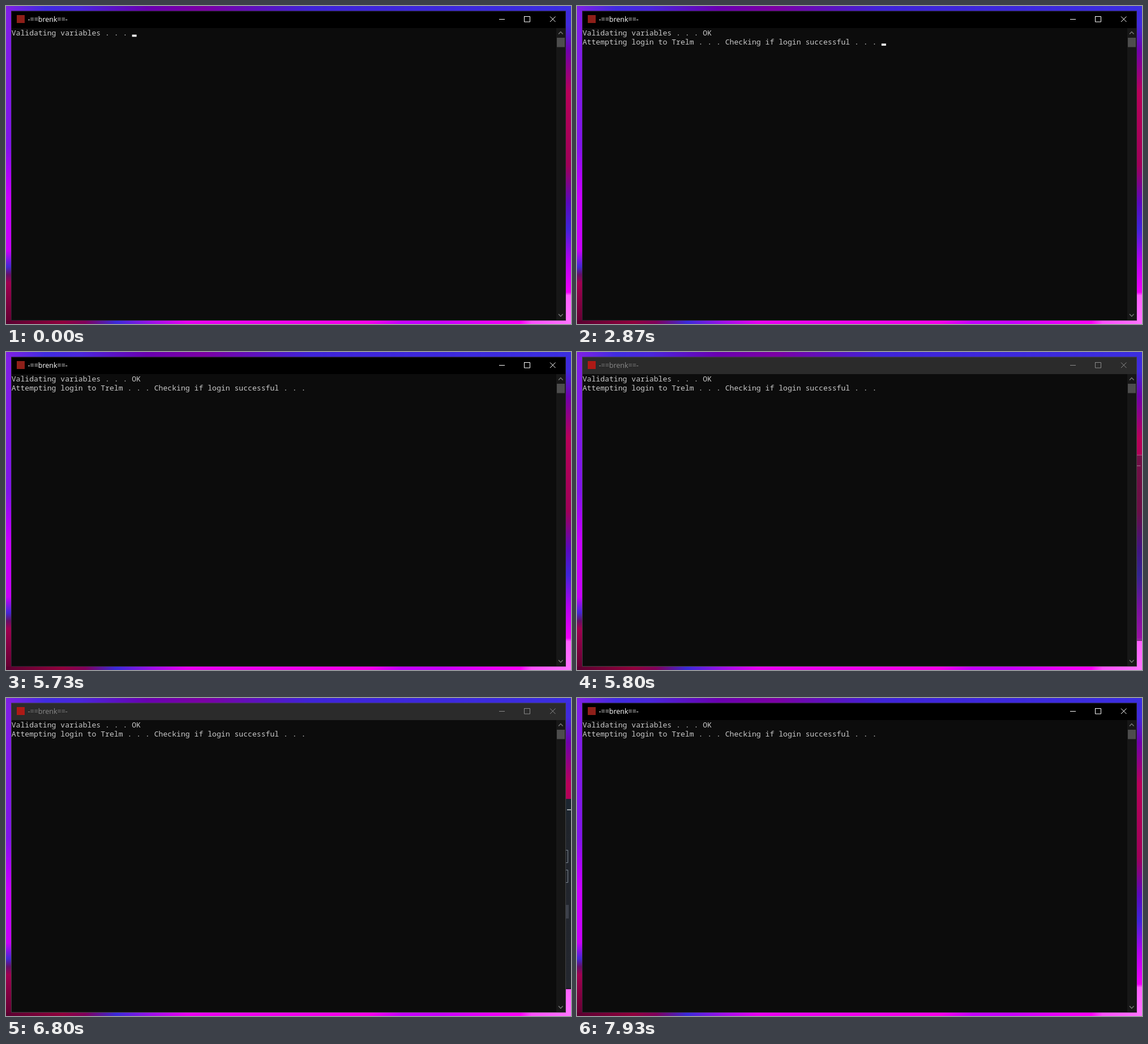
An HTML page with a canvas that plays this animation: 998 by 561 pixels, repeating every 8 s.

```html
<!DOCTYPE html>
<html lang="en">
<head>
<meta charset="utf-8">
<title>Console login</title>
<style>
  html, body { margin: 0; width: 100%; height: 100%; overflow: hidden; background: #000; }
  canvas { display: block; }
</style>
</head>
<body>
<canvas id="stage" width="998" height="561"></canvas>
<script>
const ctx = document.getElementById('stage').getContext('2d');
const W = 998, H = 561;
const LOOP = 8000, FPS = 15, BLINK = 520;
const CELL = 7.88, LINE = 15.75;

function rect(x, y, w, h, color) {
  ctx.fillStyle = color;
  ctx.fillRect(x, y, w, h);
}

// Stops are written as in CSS: colour and percentage.
function strip(x, y, w, h, stops) {
  const gradient = ctx.createLinearGradient(x, y, w > h ? x + w : x, w > h ? y : y + h);
  for (const stop of stops.split(', ')) {
    const [color, percent] = stop.split(' ');
    gradient.addColorStop(parseFloat(percent) / 100, color);
  }
  rect(x, y, w, h, gradient);
}

function path(color, width, ...lines) {
  ctx.strokeStyle = color;
  ctx.lineWidth = width;
  ctx.beginPath();
  for (const [x, y, ...rest] of lines) {
    ctx.moveTo(x, y);
    for (let i = 0; i < rest.length; i += 2) ctx.lineTo(rest[i], rest[i + 1]);
  }
  ctx.stroke();
}

function text(string, x, y, font, color) {
  ctx.font = font;
  ctx.fillStyle = color;
  ctx.fillText(string, x, y);
}

// Only the edges of the wallpaper show around the window.
function wallpaper() {
  strip(0, 0, 10, H, '#8020e6 0%, #8014ea 44%, #b400fc 54%, #c800ff 60%, #c800fa 77%, #4428d4 82%, #641068 84.5%, #a00050 87%, #600030 100%');
  strip(988, 0, 10, H, '#3b2ade 0%, #402adc 6%, #7000ac 14%, #b80058 27%, #a00058 50%, #5a08c0 62%, #3f24d8 70%, #b400f0 80%, #f000f8 90%, #ff60ff 91%, #ff74ff 100%');
  strip(0, 0, W, 9, '#8020e4 0%, #402ce0 7%, #4a26dc 13%, #6a00b0 25%, #7c00a4 35%, #3f24d8 54%, #3b2ee0 100%');
  strip(0, 555, W, 6, '#5a0030 0%, #90003c 10%, #80005a 14%, #3a2ad8 19.5%, #a010e8 26%, #e800f0 32%, #f800e8 64%, #c400ff 70%, #c800ff 77%, #ff00f8 91%, #ff50ff 93%, #ff74ff 100%');
}

// Login dialog, mostly hidden behind the console.
function dialog(alpha, scale) {
  ctx.save();
  ctx.globalAlpha = alpha;
  ctx.translate(800, 345.5);
  ctx.scale(scale, scale);
  ctx.translate(-800, -345.5);
  strip(940, 178, 140, 335, '#1b2631 0%, #20242b 15%, #24272f 100%');
  rect(940, 512, 140, 1.5, '#08090b');
  if (scale < 1) rect(940, 177.5, 140, 1.2, '#c8b8c4');
  rect(991, 196.5, 9, 1.5, '#c4c9cc');
  for (const y of [268.5, 303.5]) {
    path('#7d8791', 1, [980, y, 992.5, y, 992.5, y + 22, 980, y + 22]);
  }
  rect(960, 365, 34, 24, '#3c404a');
  ctx.restore();
}

function consoleWindow(focused) {
  const ink = focused ? '#fff' : '#8a8a8a';
  rect(9, 8.5, 980, 546.5, focused ? '#2a2630' : '#414141');
  rect(10, 9.5, 978, 30, focused ? '#000' : '#2b2b2b');
  rect(10, 39, 978, 515, '#0c0c0c');
  rect(19, 16, 14, 14, focused ? '#8e1f19' : '#ad1a16');
  text('-==brenk==-', 38.5, 28, '12.5px "Open Sans", sans-serif', ink);
  path(ink, 1, [871, 23.5, 881, 23.5],
    [915.5, 18.5, 925.5, 18.5, 925.5, 28, 915.5, 28, 915.5, 18],
    [961, 18.5, 970.5, 28], [970.5, 18.5, 961, 28]);
  rect(972, 39, 16, 515, '#171717');
  rect(973, 56, 14, 16.5, '#4d4d4d');
  path('#777', 1.5, [976, 49.5, 979.8, 45.5, 983.6, 49.5], [976, 543.5, 979.8, 547.5, 983.6, 543.5]);
}

function consoleText(t) {
  const lines = ['Validating variables . . . '];
  if (t > 60) lines[0] += 'OK';
  if (t > 130) lines.push('Attempting login to Trelm . . . ');
  if (t > 2860) lines[1] += 'Checking if login successful . . . ';
  lines.forEach((line, row) =>
    text(line, 9.7, 51.8 + row * LINE, '13.13px "Noto Sans Mono", monospace', '#cacaca'));
  return lines;
}

// Blinking restarts after output and after the window regains focus.
function cursorShown(t) {
  if (t > 5790 && t < 7390) return false;
  const restart = [7390, 2950, 310, 0].find(moment => t >= moment);
  return Math.floor((t - restart) / BLINK) % 2 === 0;
}

function draw(time) {
  const t = Math.floor((time % LOOP + 4) * FPS / 1000) * 1000 / FPS;
  const focused = t < 5790 || t > 6860;
  ctx.clearRect(0, 0, W, H);
  wallpaper();

  if (!focused) {
    const eased = 1 - (1 - Math.min(1, (t - 5760) / 240)) ** 3;
    dialog(eased, 0.96 + 0.04 * eased);
  } else if (t > 6860 && t < 6990) {
    const p = (t - 6800) / 200;
    dialog(1 - p, 1 - 0.05 * p);
  }
  consoleWindow(focused);

  const lines = consoleText(t);
  if (cursorShown(t)) {
    const row = lines.length - 1;
    rect(9.9 + lines[row].length * CELL, 50.5 + row * LINE, 8, 3.8, '#f2f2f2');
  }
}

const start = performance.now();
function frame() {
  draw(performance.now() - start);
  requestAnimationFrame(frame);
}
frame();
</script>
</body>
</html>
```
